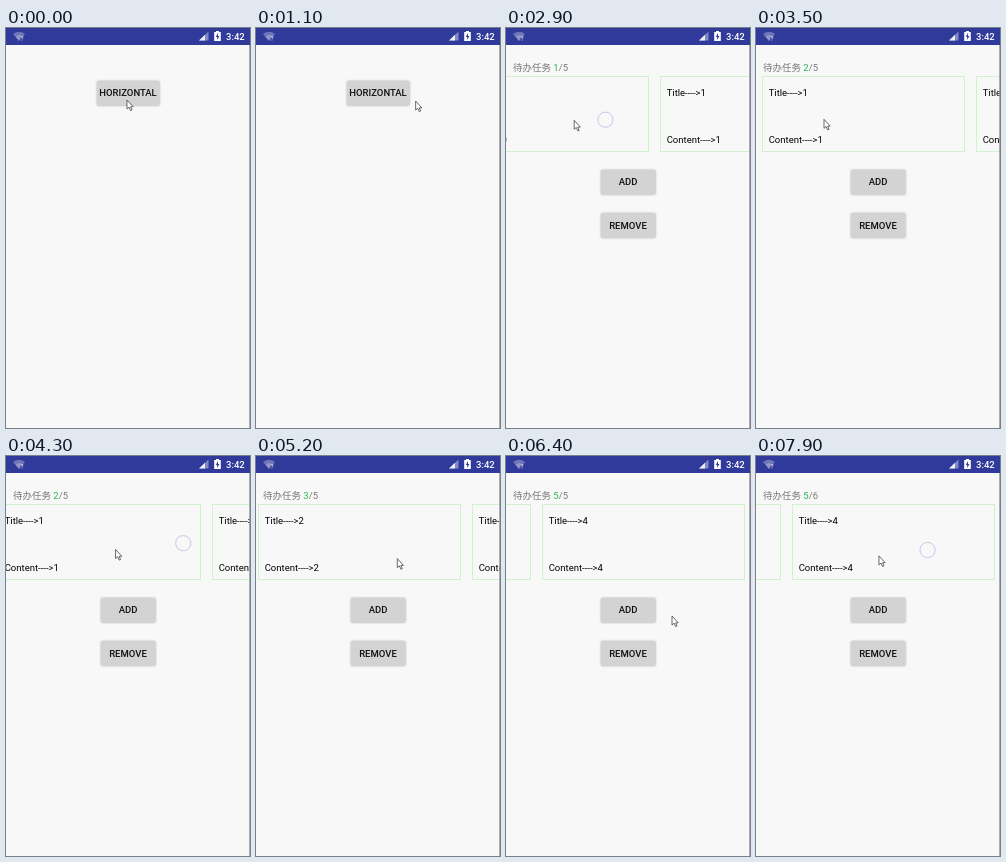
Recreate the animation shown at these times as an HTML page. Size 244 px wide and 400 px high, loop 8000 ms.

```html
<!DOCTYPE html>
<html lang="zh">
<head>
<meta charset="utf-8">
<style>
html, body { margin: 0; width: 100%; height: 100%; overflow: hidden; background: #f8f8f8; }
svg { display: block; width: 244px; height: 400px; font: 9.5px Roboto, "Noto Sans CJK SC", "Noto Sans CJK", sans-serif; }
.button rect { fill: #d3d3d3; filter: drop-shadow(0 .7px .8px rgba(0,0,0,.3)); }
.button text { font-weight: 500; text-anchor: middle; fill: #111; }
.card rect { fill: none; stroke: #cff2cc; }
</style>
</head>
<body>
<svg viewBox="0 0 244 400">
  <rect width="244" height="400" fill="#f8f8f8"/>
  <g id="home"></g>
  <g id="page">
    <rect width="244" height="400" fill="#f8f8f8"/>
    <rect width="244" height="17" fill="#303a9b"/>
    <text x="7" y="43" fill="#777">待办任务 <tspan id="current" fill="#25b558"></tspan>/<tspan id="total"></tspan></text>
    <g id="cards"></g>
  </g>
  <path d="M243.5 17V400" stroke="#999" stroke-width=".8"/>
  <g fill="#fff">
    <rect width="244" height="17" fill="#303a9b"/>
    <path d="M7 6Q13 1.5 19 6L13 13Z" opacity=".3"/>
    <path d="M9.5 8.5Q13 6 15 7.5L13 13Z" opacity=".25"/>
    <text x="14.5" y="12.5" font-size="6.5" opacity=".9">?</text>
    <path d="M193 12.5H202.5V3.5Z" opacity=".4"/>
    <path d="M193 12.5H199V6.8Z" opacity=".85"/>
    <path d="M210 3H213V4H214.8V13H208.2V4H210Z"/>
    <path d="M212 5L209.8 9H211.2V12L213.4 8H212Z" fill="#303a9b"/>
    <text x="220" y="12" font-weight="500">3:42</text>
  </g>
  <circle id="touch" r="7.6" fill="none" stroke="#c6c6ea"/>
  <path id="cursor" d="M0 0V9L2.1 7.2L3.6 10.6L5 10L3.6 6.8H6.2Z" fill="#fff" stroke="#444" stroke-width=".8"/>
</svg>
<script>
const $ = id => document.getElementById(id);
const LOOP = 8000, PITCH = 214, OPEN_AT = 1832, TAP_AT = 6900;

// Pointer moves: start, end, destination x and y, whether the screen is touched.
const moves = [
  [0, 300, 118, 67], [700, 1500, 201, 79], [2000, 2600, 190, 90],
  [2654, 3016, 30, 93, true], [3200, 4150, 190, 86],
  [4225, 4370, 40, 100, true], [4450, 5100, 188, 82],
  [5135, 5304, 50, 143, true], [5400, 6350, 166, 160], [6500, 6850, 143, 159],
  [TAP_AT, TAP_AT + 150, 143, 159, true], [7400, 7700, 188, 92],
  [7810, 8008, 40, 110, true]
];
// Card flings: start, distance.
const flings = [[2784, 214], [4278, 218], [5230, 394]];
const FLING_TIME = 700, TOUCH_LAG = 50, TOUCH_SHOWN = 70;

const progress = (t, start, end) => Math.min(1, Math.max(0, (t - start) / (end - start)));
const smooth = p => p * p * (3 - 2 * p);
const easeOut = (p, power) => 1 - (1 - p) ** power;
const place = (id, x, y) => $(id).setAttribute('transform', `translate(${x} ${y})`);

function pointerAt(t) {
  let x = 121, y = 72;
  for (const [start, end, toX, toY] of moves) {
    const p = smooth(progress(t, start, end));
    x += (toX - x) * p;
    y += (toY - y) * p;
  }
  return [x, y];
}

const scrollAt = t => flings.reduce((sum, [start, distance]) =>
  sum + distance * easeOut(progress(t, start, start + FLING_TIME), 2), 0);

function addButton(parent, label, y, width) {
  $(parent).insertAdjacentHTML('beforeend', `<g class="button">
    <rect x="${122.2 - width / 2}" y="${y}" width="${width}" height="24.6" rx="1.4"/>
    <text x="122" y="${y + 15.4}">${label}</text></g>`);
  return $(parent).lastElementChild.firstElementChild;
}

addButton('home', 'HORIZONTAL', 53, 62.5);
const addRect = addButton('page', 'ADD', 142, 54.4);
addButton('page', 'REMOVE', 185.2, 54.4);

for (let i = 0; i < 6; i++) {
  $('cards').insertAdjacentHTML('beforeend', `<g class="card" transform="translate(${6.5 + i * PITCH})">
    <rect y="48.5" width="202" height="75"/>
    <text x="6.2" y="68.2">Title----&gt;${i}</text>
    <text x="6.2" y="115">Content----&gt;${i}</text></g>`);
}

function draw(t) {
  $('page').style.opacity = easeOut(progress(t, OPEN_AT, OPEN_AT + 200), 4);
  place('page', 0, 32 * (1 - easeOut(progress(t, OPEN_AT, OPEN_AT + 350), 5)));

  const scroll = Math.round(scrollAt(t));
  place('cards', -scroll, 0);
  $('current').textContent = 1 + Math.floor((scroll + 40) / PITCH);
  $('total').textContent = t < TAP_AT + 100 ? 5 : 6;
  addRect.style.fill = t >= TAP_AT && t < TAP_AT + 400 ? '#c6c6c6' : '';

  place('cursor', ...pointerAt(t));
  place('touch', ...pointerAt(t - TOUCH_LAG));
  const touching = moves.some(([start, end, , , touch]) =>
    touch && t >= start + TOUCH_SHOWN && t < end + TOUCH_SHOWN);
  $('touch').style.opacity = touching ? 1 : 0;
}

const began = performance.now();
function frame() {
  draw((performance.now() - began) % LOOP);
  requestAnimationFrame(frame);
}
frame();
</script>
</body>
</html>
```
